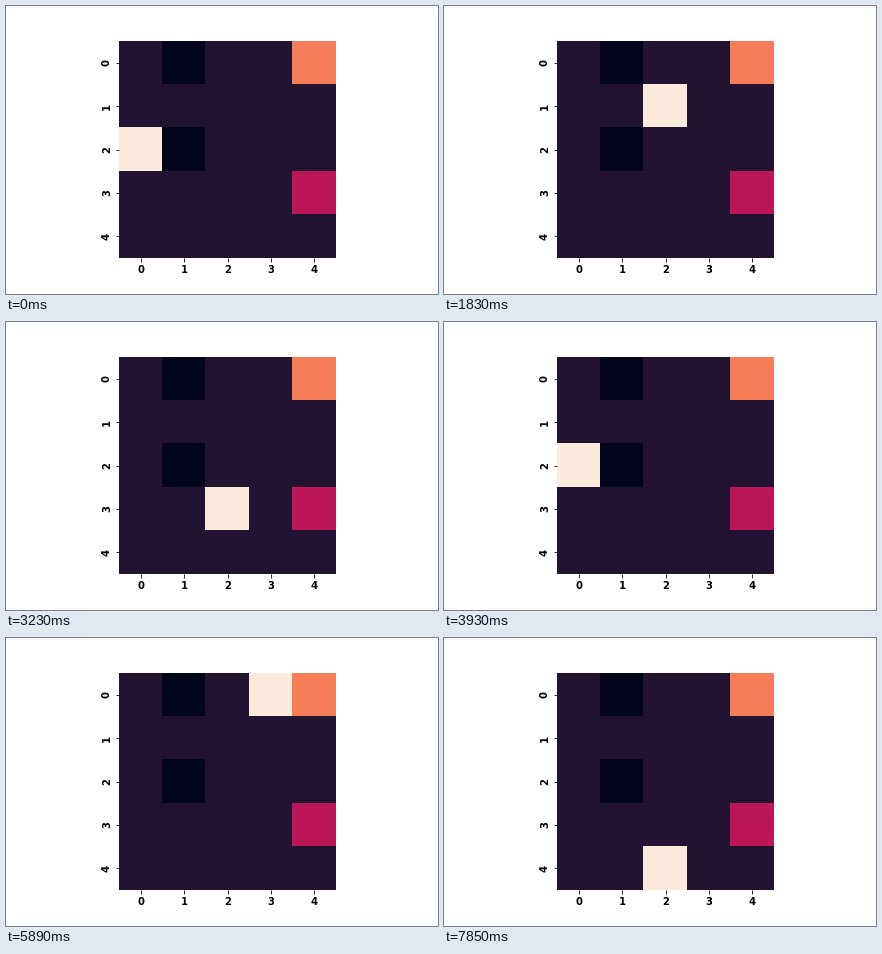
A matplotlib script that plays this animation: 432x288 px, repeating every 7990 ms.

```python
import numpy as np
import matplotlib.pyplot as plt
from matplotlib.animation import FuncAnimation
from matplotlib.colors import ListedColormap

plt.rcParams["font.family"] = "DejaVu Sans"

W, H, DPI = 432, 288, 72
LEFT, BOTTOM, SIDE, N = 113, 36, 217, 5
LOOP_MS = 7990

FLOOR, WALL, GOAL, PIT, AGENT = range(5)
COLORS = ["#221330", "#03051a", "#f57d57", "#bb1656", "#faebdd"]

START = (2, 0)
STEP = {"U": (-1, 0), "D": (1, 0), "L": (0, -1), "R": (0, 1), ".": (0, 0)}
# One string of moves per episode; "." is a bump that leaves the agent in place.
EPISODES = [
    "UU.....DRRU.DRLRLRLDDRLRUDR",
    "..U.DUU.DR.RRUR",
    "U..D.DR.RDLR",
]


def walk(moves):
    cell = START
    cells = [cell]
    for move in moves:
        dr, dc = STEP[move]
        cell = (cell[0] + dr, cell[1] + dc)
        cells.append(cell)
    return cells


path = [cell for moves in EPISODES for cell in walk(moves)]

world = np.full((N, N), FLOOR)
world[0, 1] = world[2, 1] = WALL
world[0, 4] = GOAL
world[3, 4] = PIT

fig = plt.figure(figsize=(W / DPI, H / DPI), dpi=DPI, facecolor="white")
ax = fig.add_axes([LEFT / W, BOTTOM / H, SIDE / W, SIDE / H])

cell_size = SIDE / N
edges = np.floor(np.arange(N + 1) * cell_size + 1e-6)
mesh = ax.pcolormesh(edges, edges, world, cmap=ListedColormap(COLORS),
                     vmin=-0.5, vmax=len(COLORS) - 0.5)

ax.set_xlim(0, SIDE)
ax.set_ylim(SIDE, 0)
for spine in ax.spines.values():
    spine.set_visible(False)

centers = (np.arange(N) + 0.5) * cell_size
names = [str(i) for i in range(N)]
ax.set_xticks(centers, names, fontsize=10, weight="bold")
ax.set_yticks(centers, names, fontsize=10, weight="bold",
              rotation=90, va="center")
ax.tick_params(length=3.5, width=0.8, pad=3.5)


def draw(i):
    grid = world.copy()
    grid[path[i]] = AGENT
    mesh.set_array(grid)
    return [mesh]


anim = FuncAnimation(fig, draw, frames=len(path),
                     interval=LOOP_MS / len(path), repeat=True, repeat_delay=0)
plt.show()
```
